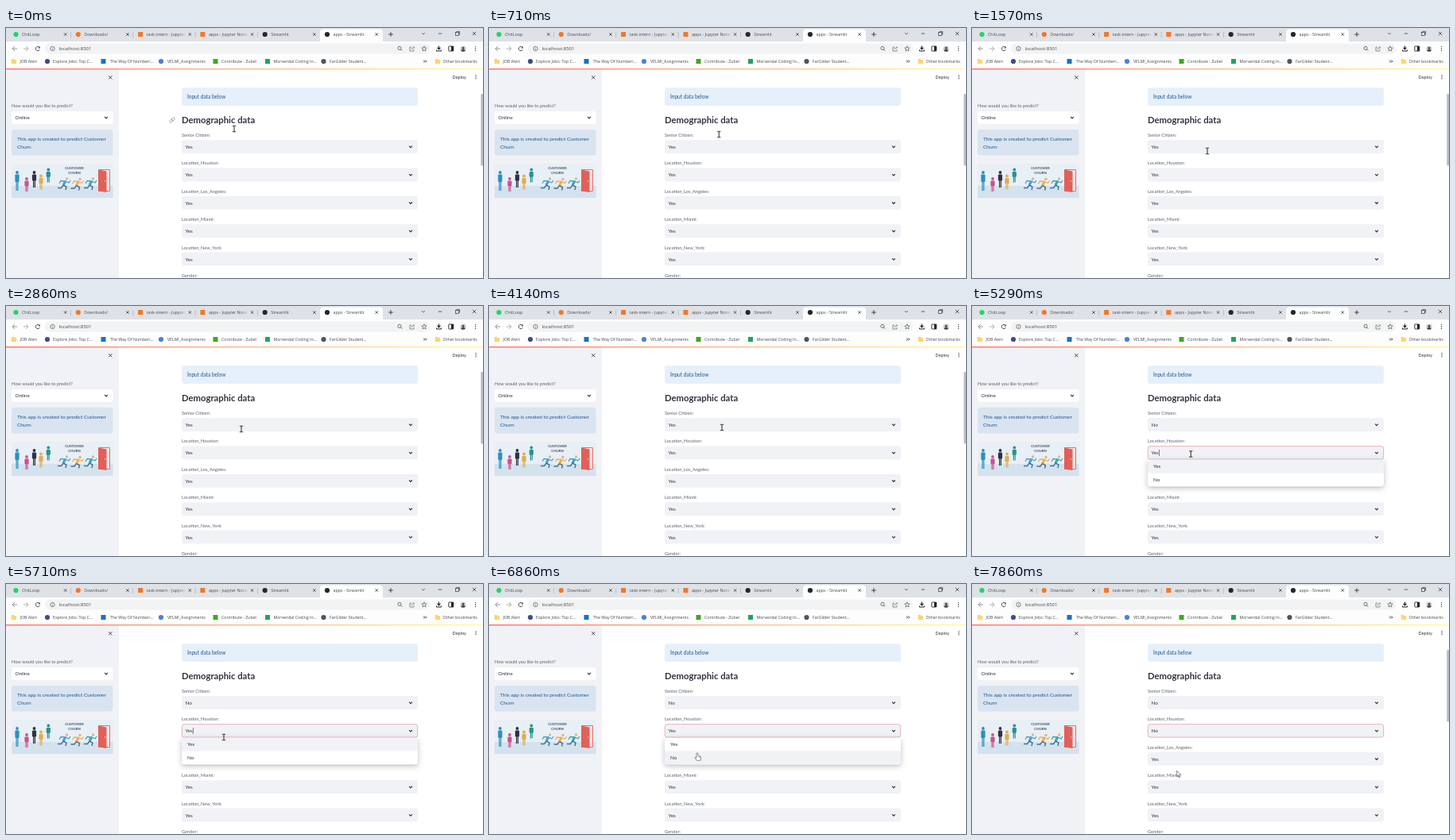
Animation, 600 px wide and 315 px high, one loop 8000 ms. Source, as an HTML page with a canvas:

```html
<!DOCTYPE html>
<html lang="en">
<head>
<meta charset="utf-8">
<title>Churn form</title>
<style>
html, body { margin: 0; width: 100%; height: 100%; overflow: hidden; background: #fff; }
canvas { display: block; width: 600px; height: 315px; }
</style>
</head>
<body>
<canvas id="stage"></canvas>
<script>
const W = 600, H = 315, LOOP = 8000, RATE = 7;
const canvas = document.getElementById('stage');
const dpr = window.devicePixelRatio || 1;
canvas.width = W * dpr;
canvas.height = H * dpr;
const c = canvas.getContext('2d');
c.scale(dpr, dpr);

const UI = '"Open Sans", "Noto Sans", sans-serif';
const APP = 'Lato, "Open Sans", sans-serif';
const STRIP = '#dee1e6', BAR = '#fdfdfd', INK = '#31333f', CHROME = '#48494d';
const FIELD = '#f0f2f6', LABEL = '#5f616b', NOTE = '#1c5590', RED = '#ff4b4b';

// ---- drawing helpers ----
function text(s, x, y, size, { font = APP, color = INK, weight = 400, align = 'left' } = {}) {
  c.font = `${weight} ${size}px ${font}`;
  c.textAlign = align;
  c.fillStyle = color;
  c.fillText(s, x, y + size * 0.35);
}
function rect(x, y, w, h, color) {
  c.fillStyle = color;
  c.fillRect(x, y, w, h);
}
function round(x, y, w, h, r, fill, stroke, lw = 0.7) {
  c.beginPath();
  c.roundRect(x, y, w, h, r);
  if (fill) { c.fillStyle = fill; c.fill(); }
  if (stroke) { c.strokeStyle = stroke; c.lineWidth = lw; c.stroke(); }
}
function dot(x, y, r, color) {
  c.beginPath();
  c.arc(x, y, r, 0, Math.PI * 2);
  c.fillStyle = color;
  c.fill();
}
function ring(x, y, r, color, lw = 0.8) {
  c.beginPath();
  c.arc(x, y, r, 0, Math.PI * 2);
  c.strokeStyle = color;
  c.lineWidth = lw;
  c.stroke();
}
// Polyline from flat coordinates, offset by x, y
function line(x, y, pts, color, lw = 0.8) {
  trace(x, y, pts);
  c.strokeStyle = color;
  c.lineWidth = lw;
  c.stroke();
}
function shape(x, y, pts, fill, stroke, lw = 0.6) {
  trace(x, y, pts);
  c.closePath();
  c.fillStyle = fill;
  c.fill();
  if (stroke) { c.strokeStyle = stroke; c.lineWidth = lw; c.stroke(); }
}
function trace(x, y, pts) {
  c.beginPath();
  for (let i = 0; i < pts.length; i += 2) c.lineTo(x + pts[i], y + pts[i + 1]);
}
function cross(x, y, r, color, lw) {
  line(x, y, [-r, -r, r, r], color, lw);
  line(x, y, [r, -r, -r, r], color, lw);
}
const chevron = (x, y) => line(x, y, [-1.9, -0.9, 0, 1, 1.9, -0.9], INK, 1.2);

// ---- browser ----
const TABS = [
  ['ChitLoop', '#25d366'], ['Downloads/', '#f37726'],
  ['task-intern - Jupyter', '#f37726', 1], ['apps - Jupyter Notebook', '#f37726', 1],
  ['Streamlit', '#26272b'], ['apps - Streamlit', '#26272b']
];
const MARKS = [
  [52, 59, 'Explore Jobs: Top C...', '#3d4f86'],
  [122.5, 131, 'The Way Of Numberi...', '#1473c8', 1],
  [195, 203, 'VELMI_Assignments', '#4a80e0'],
  [263.5, 271, 'Contribute - Zubel', '#3fa81e', 1],
  [329, 336.5, 'Morvendal Coding In...', '#1fa463', 1],
  [399.5, 407, 'FarGlider Student...', '#4b5563']
];
function badge(x, y, color, square) {
  if (square) rect(x - 3, y - 3, 6, 6, color);
  else dot(x, y, 3.1, color);
}
function folder(x, y) {
  round(x - 3.2, y - 2.8, 3.4, 2, 0.6, '#f0c14b');
  round(x - 3.2, y - 2, 6.4, 4.9, 0.7, '#fbd66e');
}
function tabs() {
  rect(0, 0, W, 17, STRIP);
  round(395, 1.5, 79, 20, 4, BAR);
  TABS.forEach(([label, color, square], i) => {
    const x = 20 + i * 78.3, bg = i === 5 ? BAR : STRIP;
    badge(x - 7.5, 8, color, square);
    const fade = c.createLinearGradient(x + 40, 0, x + 50, 0);
    fade.addColorStop(0, CHROME);
    fade.addColorStop(1, bg);
    c.save();
    c.beginPath();
    c.rect(x, 0, 50, 17);
    c.clip();
    text(label, x, 8, 5.35, { font: UI, color: fade });
    c.restore();
    cross(x + 54.7, 8, 1.7, '#333', 0.8);
    if (i < 4) rect(x + 61.2, 5, 0.6, 7, '#a3a7ad');
  });
  line(484, 8, [-2.8, 0, 2.8, 0], '#333', 0.9);
  line(484, 8, [0, -2.8, 0, 2.8], '#333', 0.9);
  line(525, 7, [-1.9, -0.9, 0, 1, 1.9, -0.9], '#333', 0.7);
  line(546, 7, [-2.2, 0, 2.2, 0], '#222', 0.7);
  line(568, 7, [-1.2, -1.5, -1.2, -2.6, 2.6, -2.6, 2.6, 1.2, 1.5, 1.2], '#222', 0.6);
  c.strokeRect(565.4, 5.6, 4, 4);
  cross(589, 7, 2.2, '#222', 0.7);
}
function avatar(x, y) {
  c.save();
  dot(x, y, 3.8, '#d4d6da');
  c.clip();
  dot(x, y - 0.8, 1.5, '#45484f');
  dot(x, y + 3.6, 2.9, '#45484f');
  c.restore();
}
function toolbar() {
  rect(0, 17, W, 35, BAR);
  line(11, 26, [3, 0, -3, 0], '#888', 0.9);
  line(11, 26, [0, -3, -3, 0, 0, 3], '#888', 0.9);
  line(25, 26, [-3, 0, 3, 0], '#aaa', 0.9);
  line(25, 26, [0, -3, 3, 0, 0, 3], '#aaa', 0.9);
  c.beginPath();
  c.arc(40, 26, 2.7, 0.4, 5.4);
  c.strokeStyle = '#444';
  c.lineWidth = 0.9;
  c.stroke();
  shape(42.8, 23, [0, 0, 0, 2.6, -2.6, 2.6], '#444');

  round(49, 19.5, 484, 13, 6.5, '#f1f3f4');
  ring(58.5, 26, 2.7, '#555', 0.7);
  line(58.5, 26, [0, -0.3, 0, 1.5], '#555', 0.7);
  dot(58.5, 24.7, 0.4, '#555');
  text('localhost:8501', 66.5, 26, 6.1, { font: UI, color: CHROME });

  ring(495, 25.4, 2.1, '#555');
  line(495, 25.4, [1.5, 1.5, 3.2, 3.2], '#555', 0.9);
  line(511, 26, [-1, -2, -3, -2, -3, 3, 2, 3, 2, 1], '#666', 0.7);
  line(511, 26, [-1, 1, 0, -1, 3, -1, 1.4, -2.8], '#666', 0.7);
  const star = [];
  for (let i = 0; i < 11; i++) {
    const a = i * Math.PI / 5 - Math.PI / 2, r = i % 2 ? 1.5 : 3.4;
    star.push(Math.cos(a) * r, Math.sin(a) * r);
  }
  line(526, 26.2, star, '#555', 0.7);
  line(544.5, 25.5, [0, -3, 0, 1.2], '#222', 1.1);
  line(544.5, 25.5, [-2, -0.8, 0, 1.4, 2, -0.8], '#222', 1.1);
  line(544.5, 25.5, [-3, 2, -3, 3.5, 3, 3.5, 3, 2], '#222', 1);
  round(556.8, 23, 6, 6, 0.6, null, '#222', 0.9);
  rect(560, 23, 2.8, 6, '#222');
  avatar(575, 26);
  for (const d of [-2.4, 0, 2.4]) dot(590.5, 26 + d, 0.65, '#333');

  folder(10, 42);
  text('JOB Alert', 17.5, 42, 5.2, { font: UI, color: CHROME });
  for (const [ix, x, label, color, square] of MARKS) {
    badge(ix, 42, color, square);
    text(label, x, 42, 5.2, { font: UI, color: CHROME });
  }
  for (const x of [526, 528.2]) line(x, 42, [-0.8, -1.5, 0.7, 0, -0.8, 1.5], '#333', 0.9);
  folder(543, 42);
  text('Other bookmarks', 549.5, 42, 5.25, { font: UI, color: CHROME });
}

// ---- sidebar ----
function person(x, y, h, color) {
  dot(x, y + 2, 1.9, color);
  round(x - 2.6, y + 4.4, 5.2, h * 0.38, 1.2, color);
  rect(x - 1.5, y + 6, 1.2, h - 6, color);
  rect(x + 0.3, y + 6, 1.2, h - 6, color);
}
function runner(x, y, color) {
  dot(x + 4.5, y - 6, 1.7, '#e0b48f');
  line(x, y, [3, -3.5, 0, 2], color, 3.2);
  line(x, y, [3, -3, 7, -1, 9, -4], color, 1.3);
  line(x, y, [2, -3, -3, -3.5, -5, 0], color, 1.3);
  line(x, y, [0, 2, 4, 4, 3, 8], '#4a6f8f', 1.4);
  line(x, y, [0, 2, -2.5, 5.5, -7, 5.5], '#4a6f8f', 1.4);
}
function picture() {
  c.save();
  c.beginPath();
  c.rect(7, 171, 127.5, 43);
  c.clip();
  rect(7, 171, 128, 43, '#e8eff5');
  rect(7, 199, 128, 15, '#d3e2ed');
  person(14, 180, 25, '#2a8fc0');
  person(26, 188, 18, '#c9538f');
  person(35.5, 180, 21, '#2e3243');
  person(44, 184.5, 19, '#dcae55');
  person(53.3, 176.5, 18, '#2b9290');
  const bold = { weight: 700, align: 'center', color: '#3d4c60' };
  text('CUSTOMER', 86, 176.5, 4.3, bold);
  text('CHURN', 86, 182, 4.3, bold);
  runner(72, 196, '#49a0d8');
  runner(88.5, 196.5, '#f0b04f');
  runner(105, 196, '#3ba6b5');
  round(116.5, 178.5, 14, 27, 0.3, '#f5e4e4', '#e0605a', 0.9);
  shape(116, 178.5, [0, 0, 10.5, 2, 10.5, 28.5, 0, 27], '#e0605a');
  dot(124.5, 193, 0.7, '#f7e3c0');
  c.restore();
}
function sidebar() {
  rect(0, 52, 142, H - 52, FIELD);
  cross(131.3, 62.3, 2.1, INK, 0.9);
  text('How would you like to predict?', 7, 98, 5.65, { color: LABEL });
  round(7, 105, 127.5, 15.7, 3, '#fff');
  text('Online', 11.5, 112.8, 6.35);
  chevron(126, 112.8);
  round(7, 128, 127.5, 32.5, 3, '#d9e4f0');
  text('This app is created to predict Customer', 14, 139.7, 6.5, { color: NOTE });
  text('Churn', 14, 149.6, 6.5, { color: NOTE });
  picture();
}

// ---- form ----
const FIELDS = ['Senior Citizen:', 'Location_Houston:', 'Location_Los_Angeles:',
  'Location_Miami:', 'Location_New_York:', 'Gender:'];
// Tick at which each list opens and closes; "No" is picked on closing
const PICKS = [{ open: 30, close: 34, blur: 37 }, { open: 37, close: 50, blur: 99 }];
const fieldY = i => 141 + i * 35.4;
const isOpen = (pick, tick) => pick && tick >= pick.open && tick < pick.close;

function linkIcon() {
  c.save();
  c.translate(209, 116);
  c.rotate(-Math.PI / 4);
  round(-4, -1.5, 4.6, 3, 1.5, null, '#8a8c94');
  round(-0.6, -1.5, 4.6, 3, 1.5, null, '#8a8c94');
  c.restore();
}
function popup(y, hoverY) {
  const top = y + 17.4, row = 16.8;
  c.save();
  c.shadowColor = 'rgba(0,0,0,.24)';
  c.shadowBlur = 7 * dpr;
  c.shadowOffsetY = 2 * dpr;
  round(221, top, 297, row * 2, 3, '#fff');
  c.restore();
  const second = hoverY > top + row;
  round(221, top + (second ? row : 0), 297, row,
    second ? [0, 0, 3, 3] : [3, 3, 0, 0], FIELD);
  text('Yes', 228, top + 8.4, 6.35);
  text('No', 228, top + row + 8.4, 6.35);
}
function form(tick, pointer) {
  rect(142, 52, W - 142, H - 52, '#fff');
  const glow = c.createLinearGradient(0, 0, W, 0);
  glow.addColorStop(0, RED);
  glow.addColorStop(1, '#fffd80');
  text('Deploy', 561.5, 61.7, 5.5);
  for (const d of [-2, 0, 2]) dot(591, 61.7 + d, 0.65, INK);
  round(221, 75.3, 297, 22.7, 3, '#e6f0fa');
  text('Input data below', 228, 86.8, 6.55, { color: NOTE });
  text('Demographic data', 221, 116.3, 11.3, { weight: 700 });
  if (pointer.y < 131) linkIcon();

  FIELDS.forEach((label, i) => {
    const y = fieldY(i), pick = PICKS[i];
    const focus = pick && tick >= pick.open && tick < pick.blur;
    text(label, 221, y - 5.9, 5.7, { color: LABEL });
    round(221, y, 297, 17, 3, FIELD);
    if (focus) round(221.3, y + 0.3, 296.4, 16.4, 3, null, '#e2868c', 0.6);
    text(pick && tick >= pick.close ? 'No' : 'Yes', 225.5, y + 8.7, 6.35);
    chevron(509, y + 8.6);
    const lit = isOpen(pick, tick) && Math.floor((tick - pick.open) / RATE * 2) % 2 === 0;
    if (lit) rect(235.3, y + 4.6, 0.6, 8, INK);
  });
  PICKS.forEach((p, i) => {
    if (isOpen(p, tick)) popup(fieldY(i), pointer.y);
  });
  rect(0, 51.2, W, 1.1, glow);
  // An open list locks scrolling and hides the bar
  if (!PICKS.some(p => isOpen(p, tick))) round(597.3, 83, 2.7, 90.5, 1, '#b9bbc1');
}

// ---- pointer: tick, x, y of the hot spot, shape ----
const PATH = [
  [3, 287, 127, 'beam'], [11, 296, 155, 'beam'], [28, 296, 155, 'beam'],
  [30, 290, 151, 'beam'], [31, 283, 163, 'hand'], [32, 277, 174, 'hand'],
  [33, 277, 179, 'hand'], [34, 277, 181, 'beam'], [36, 276, 186, 'beam'],
  [38, 274.5, 187, 'beam'], [40, 274, 193, 'beam'], [41, 273, 198, 'hand'],
  [44, 262, 213, 'hand'], [49, 262, 213, 'hand'], [50, 262, 214, 'beam'],
  [52, 259, 230, 'arrow'], [53, 257.7, 235.3, 'arrow']
];
function pointerAt(tick) {
  const i = Math.max(0, PATH.findLastIndex(p => p[0] <= tick));
  const a = PATH[i], b = PATH[i + 1] || a;
  const k = b === a ? 0 : Math.max(0, (tick - a[0]) / (b[0] - a[0]));
  return { x: a[1] + (b[1] - a[1]) * k, y: a[2] + (b[2] - a[2]) * k, kind: a[3] };
}
const CURSORS = {
  beam(x, y) {
    line(x, y, [0, -3.5, 0, 3.5], '#111', 0.9);
    line(x, y, [-2.2, -3.7, 2.2, -3.7], '#111', 0.8);
    line(x, y, [-2.2, 3.7, 2.2, 3.7], '#111', 0.8);
  },
  hand(x, y) {
    shape(x, y, [-0.9, 0.3, 0, -0.3, 0.9, 0.3, 0.9, 3.4, 4.3, 4.3, 4.7, 5.2, 4, 9.3,
      -0.7, 9.3, -3.2, 5.7, -2.6, 5, -0.9, 6.2], '#fff', '#444', 0.6);
    line(x, y, [2.1, 4, 2.1, 5.6], '#444', 0.4);
    line(x, y, [3.2, 4.2, 3.2, 5.7], '#444', 0.4);
  },
  arrow(x, y) {
    shape(x, y, [0, 0, 0, 7.4, 1.7, 5.9, 2.9, 8.6, 4.1, 8.1, 2.9, 5.4, 5.2, 5.3],
      '#fff', '#333', 0.6);
  }
};

function draw(now) {
  const tick = Math.floor((now % LOOP + 5) * RATE / 1000);
  const pointer = pointerAt(tick);
  tabs();
  toolbar();
  sidebar();
  form(tick, pointer);
  CURSORS[pointer.kind](pointer.x, pointer.y);
}
const start = performance.now();
function loop() {
  draw(performance.now() - start);
  requestAnimationFrame(loop);
}
loop();
</script>
</body>
</html>
```
